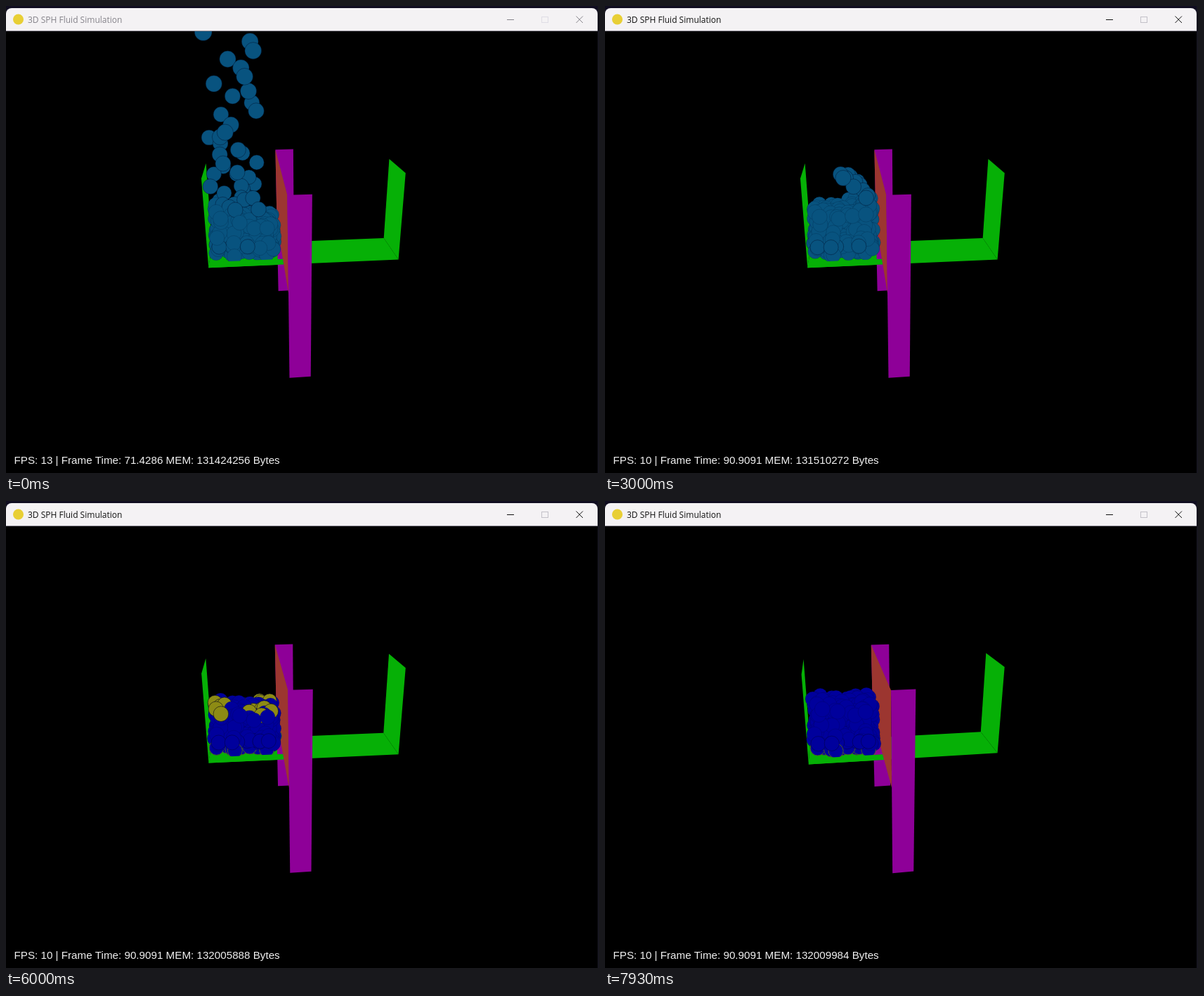
Write an HTML page with a canvas that moves like this. It is 844 px wide and 664 px high and loops after 8000 ms.

```html
<!DOCTYPE html>
<html lang="en">
<head>
<meta charset="utf-8">
<title>3D SPH Fluid Simulation</title>
<style>
  html, body { margin: 0; width: 100%; height: 100%; overflow: hidden; background: #000; }
  canvas { display: block; }
</style>
</head>
<body>
<canvas id="stage" width="844" height="664"></canvas>
<script>
const ctx = document.getElementById('stage').getContext('2d');
const LOOP = 8, ACTIVATE = 2.6, RECOLOR = 3.43;   // seconds

const GREEN = '#06b006', MAGENTA = '#8e0098', ORANGE = '#9c3630';
const WATER = '#08537f', BLUE = '#00009c', YELLOW = '#8d8b14', OLIVE = '#4b5a2c';

// World units: the tank reaches from x = -1 to 1, its floor lies at y = -HALF_HEIGHT.
const HALF_HEIGHT = .47, HALF_DEPTH = .311, PLATE_DEPTH = .94;
const PLATE_LEFT = -.225, PLATE_RIGHT = -.01, PLATE_BOTTOM = -1.434;
const RADIUS = .077;

const CAMERA = { x: 421.5, y: 349, focal: 715, distance: 5.36, rise: .427, pitch: .405 };

// Time, camera yaw, liquid level, liquid tilt (positive: higher at the left wall).
const KEYS = [
  [0, .103, 0, .17], [1.7, .103, 0, .28], [3, .103, .1, -.1], [3.83, .103, 0, 0],
  [4.24, .103, .02, .01], [5.2, .04, .075, .05], [6.7, .165, 0, .07], [7.93, .145, .1, .04]
];

const clamp01 = x => Math.max(0, Math.min(1, x));
const smooth = x => (x = clamp01(x), x * x * (3 - 2 * x));
const mix = (a, b, p) => a + (b - a) * p;

function stateAt(s) {
  const next = KEYS.findIndex(key => key[0] > s);
  if (next < 0) return KEYS[KEYS.length - 1].slice(1);
  const from = KEYS[next - 1], to = KEYS[next];
  const p = smooth((s - from[0]) / (to[0] - from[0]));
  return from.map((v, i) => mix(v, to[i], p)).slice(1);
}

let seed = 7;
const random = () => (seed = seed * 16807 % 2147483647) / 2147483647;
const between = (a, b) => mix(a, b, random());

function makeDrops(count, kind) {
  return Array.from({ length: count }, (_, i) => ({
    kind, q: i / (count - 1), u: random(), v: random(), z: between(-.23, .2),
    phase: between(0, 6.28), rank: random()
  }));
}
const DROPS = [...makeDrops(420, 'body'), ...makeDrops(46, 'spray'), ...makeDrops(12, 'crest')]
  .sort((a, b) => a.z - b.z);

const PLACE = {
  body({ u, v, phase }, s, level, tilt) {
    const top = level + tilt * (.5 - u);
    return [mix(-.92, -.3, u) + Math.sin(s * 2 + phase) * .012,
            mix(top, -.4, v) + Math.sin(s * 3 + phase) * .012];
  },
  // Thrown upwards, then falling back into the liquid.
  spray({ q, u }, s) {
    const height = .1 + 1.65 * q ** 2.2;
    return [mix(-.95, -.45, u), Math.max(-.3, height + .9 * (height - .1) * s - 1.8 * s * s)];
  },
  // A wave that curls off the left wall and runs to the panel.
  crest({ q }, s) {
    const p = smooth((s - 1.7) / 1.3);
    const sink = .5 * Math.max(0, 1.7 - s) + .7 * Math.max(0, s - 3);
    return [mix(-.92 + .36 * q, -.62 + .27 * q, p), Math.max(-.3, mix(.26, .45 - .25 * q, p) - sink)];
  }
};

function project([x, y, z], yaw) {
  const { focal, distance, rise, pitch } = CAMERA;
  const across = x * Math.cos(yaw) + z * Math.sin(yaw);
  const near = z * Math.cos(yaw) - x * Math.sin(yaw);
  const up = y * Math.cos(pitch) - near * Math.sin(pitch) + rise;
  const scale = focal / (distance - y * Math.sin(pitch) - near * Math.cos(pitch));
  return [CAMERA.x + across * scale, CAMERA.y - up * scale, scale];
}

function face(color, yaw, ...corners) {
  ctx.beginPath();
  for (const corner of corners) ctx.lineTo(...project(corner, yaw).slice(0, 2));
  ctx.closePath();
  ctx.fillStyle = color;
  ctx.fill();
}

// Upright face facing sideways, upright face facing front, level face.
const side = (color, yaw, x, h, d) =>
  face(color, yaw, [x, h, -d], [x, h, d], [x, -h, d], [x, -h, -d]);
const plate = (yaw, z) => face(MAGENTA, yaw, [PLATE_LEFT, HALF_HEIGHT, z], [PLATE_RIGHT, HALF_HEIGHT, z],
  [PLATE_RIGHT, PLATE_BOTTOM, z], [PLATE_LEFT, PLATE_BOTTOM, z]);
const floor = (yaw, right, back) => face(GREEN, yaw, [-1, -HALF_HEIGHT, back], [right, -HALF_HEIGHT, back],
  [right, -HALF_HEIGHT, HALF_DEPTH], [-1, -HALF_HEIGHT, HALF_DEPTH]);

function drawLiquid(s, yaw, level, tilt) {
  const recolored = s >= RECOLOR;
  const lightShare = .4 * smooth((7.9 - s) / 2.4);
  ctx.lineWidth = 1;
  for (const drop of DROPS) {
    const inBody = drop.kind === 'body';
    const light = recolored && inBody && drop.v < .1 && drop.rank < lightShare;
    const [x, y, scale] = project([...PLACE[drop.kind](drop, s, level, tilt), drop.z], yaw);
    ctx.beginPath();
    ctx.arc(x, y, RADIUS * scale, 0, 7);
    ctx.fillStyle = light ? YELLOW : recolored ? BLUE : WATER;
    ctx.fill();
    ctx.strokeStyle = recolored && inBody && drop.v > .94 ? OLIVE
      : `rgba(0,0,25,${light ? .55 : inBody ? .14 : .35})`;
    ctx.stroke();
  }
}

function drawTitleBar(active) {
  ctx.fillStyle = '#100d20';
  ctx.fillRect(0, 0, 844, 36);
  ctx.fillStyle = '#f4f2f4';
  ctx.beginPath();
  ctx.roundRect(0, 3, 842, 32.5, [8, 8, 0, 0]);
  ctx.fill();
  ctx.fillStyle = '#e8cf35';
  ctx.beginPath();
  ctx.arc(17.5, 19, 7.5, 0, 7);
  ctx.fill();

  ctx.fillStyle = ctx.strokeStyle = active ? '#111' : '#85838a';
  ctx.font = '12px "Open Sans", sans-serif';
  ctx.fillText('3D SPH Fluid Simulation', 31, 23.5);
  ctx.lineWidth = 1;
  ctx.beginPath();
  ctx.moveTo(713, 19.5); ctx.lineTo(723, 19.5);
  ctx.moveTo(811.5, 14.5); ctx.lineTo(821, 24);
  ctx.moveTo(821, 14.5); ctx.lineTo(811.5, 24);
  ctx.stroke();
  ctx.strokeStyle = active ? '#c3c1c8' : '#dfdde5';
  ctx.strokeRect(762.5, 15.5, 9, 8);
}

function drawStatus(s) {
  const fps = Math.max(10, 13 - Math.floor(s / .75));
  const pages = s < RECOLOR ? Math.min(21, Math.floor(s * 11.5)) : 140 + 2 * (s > 4.5) + (s > 7.7);
  const memory = 131424256 + 4096 * pages;
  ctx.fillStyle = '#f0f0f0';
  ctx.font = '15.2px "Liberation Sans", Arial, sans-serif';
  ctx.fillText(`FPS: ${fps} | Frame Time: ${(1000 / (fps + 1)).toFixed(4)} MEM: ${memory} Bytes`, 11.5, 651);
}

function draw(s) {
  const [yaw, level, tilt] = stateAt(s);
  ctx.fillStyle = '#000';
  ctx.fillRect(0, 0, 844, 664);
  side(GREEN, yaw, -1, HALF_HEIGHT, HALF_DEPTH);
  floor(yaw, 1, -HALF_DEPTH);
  side(GREEN, yaw, 1, HALF_HEIGHT, HALF_DEPTH);
  plate(yaw, -PLATE_DEPTH);
  side(ORANGE, yaw, PLATE_LEFT, HALF_HEIGHT, PLATE_DEPTH);
  drawLiquid(s, yaw, level, tilt);
  floor(yaw, PLATE_LEFT, .17);
  plate(yaw, PLATE_DEPTH);
  drawTitleBar(s >= ACTIVATE);
  drawStatus(s);
  ctx.fillStyle = '#17161f';
  ctx.fillRect(842, 0, 2, 664);
}

const start = performance.now();
function tick() {
  draw((performance.now() - start) / 1000 % LOOP);
  requestAnimationFrame(tick);
}
tick();
</script>
</body>
</html>
```
